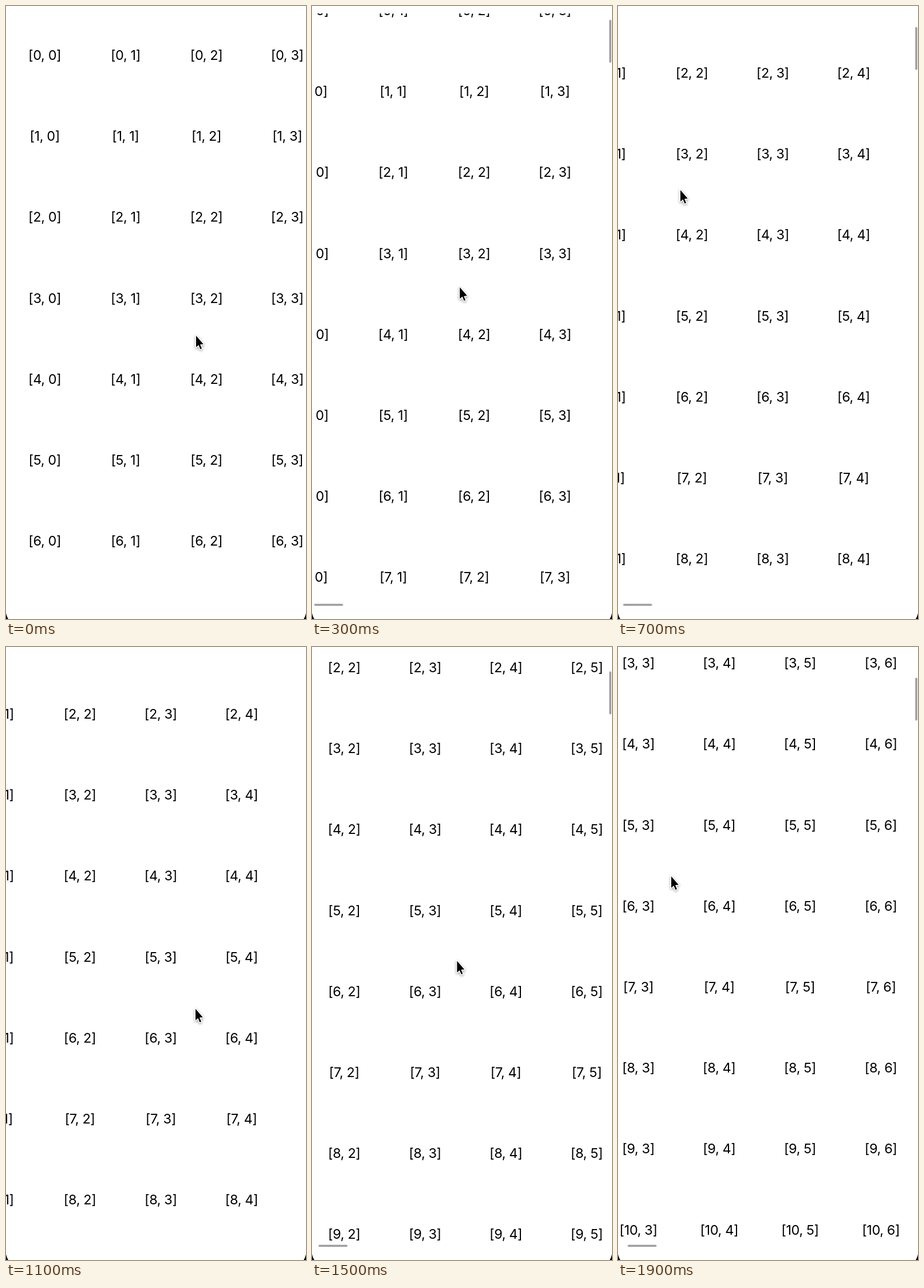
Write an HTML page with a canvas that moves like this. It is 524 px wide and 1069 px high and loops after 2 s.

```html
<!DOCTYPE html>
<html lang="en">
<head>
<meta charset="utf-8">
<title>Two-way scrolling grid</title>
<style>
  html, body { margin: 0; width: 100%; height: 100%; overflow: hidden; background: #fff; }
  canvas { display: block; }
</style>
</head>
<body>
<canvas id="stage" width="524" height="1069"></canvas>
<script>
const W = 524, H = 1069, LOOP = 2000, STEP = 100;
const VIEW_TOP = 13, VIEW_BOTTOM = 1051;
const PITCH = 141.2, FIRST_X = 67.7, FIRST_Y = 94;
const ARROW = new Path2D('M0 0V20L4.4 16.2L7.4 23.4L10 22.3L7 15.3L12.8 14.7Z');
const ctx = document.getElementById('stage').getContext('2d');

// Progress from 0 to 1 between two times
const linear = (t, from, to) => Math.min(1, Math.max(0, (t - from) / (to - from)));
const smooth = (t, from, to) => {
  const u = linear(t, from, to);
  return u * u * (3 - 2 * u);
};

// A steady drag, a move back, then a second drag that slows down
function pointerAt(t) {
  const back = smooth(t, 700, 1100);
  return [
    332 - 223 * linear(t, 102, 700) + 222 * back - 238 * smooth(t, 1267, 1877),
    575 - 254 * linear(t, 101, 700) + 310 * back - 231 * smooth(t, 1243, 1875)
  ];
}

// The content trails the pointer a little
function scrollAt(t) {
  return [
    221 * linear(t, 126, 700) + 235 * smooth(t, 1257, 1913),
    251.5 * linear(t, 120, 700) + 230 * smooth(t, 1234, 1899)
  ];
}

function barOpacity(t) {
  return linear(t, 100, 200) - linear(t, 900, 1100) + linear(t, 1300, 1400);
}

function drawGrid(sx, sy) {
  ctx.save();
  ctx.beginPath();
  ctx.rect(0, VIEW_TOP, W, VIEW_BOTTOM - VIEW_TOP);
  ctx.clip();
  ctx.fillStyle = '#000';
  ctx.font = '23.5px Inter, sans-serif';
  ctx.letterSpacing = '-0.4px';
  ctx.textAlign = 'center';
  ctx.textBaseline = 'alphabetic';
  const row0 = Math.max(0, Math.floor(sy / PITCH) - 1);
  const col0 = Math.max(0, Math.floor(sx / PITCH) - 1);
  for (let row = row0; row < row0 + 11; row++) {
    for (let col = col0; col < col0 + 6; col++) {
      ctx.fillText(`[${row}, ${col}]`, FIRST_X + col * PITCH - sx, FIRST_Y + row * PITCH - sy);
    }
  }
  ctx.restore();
}

function drawBar(x, y, w, h) {
  ctx.beginPath();
  ctx.roundRect(x, y, w, h, 1.8);
  ctx.fill();
}

function drawBars(sx, sy, alpha) {
  ctx.fillStyle = `rgba(0, 0, 0, ${0.38 * alpha})`;
  drawBar(519.2, 18.2 + sy * 0.0731, 3.6, 75);
  drawBar(1.6 + sx * 0.0335, 1042.4, 50.5, 3.6);
}

function drawCorners() {
  ctx.fillStyle = '#000';
  for (const [x, dir] of [[0, 1], [W, -1]]) {
    ctx.beginPath();
    ctx.moveTo(x, 1059);
    ctx.quadraticCurveTo(x + dir * 1.5, 1065, x + dir * 4, H);
    ctx.lineTo(x, H);
    ctx.fill();
  }
}

function drawPointer(x, y) {
  ctx.save();
  ctx.translate(x, y);
  ctx.save();
  ctx.shadowColor = 'rgba(0, 0, 0, 0.4)';
  ctx.shadowBlur = 4;
  ctx.shadowOffsetY = 1.5;
  ctx.strokeStyle = '#fff';
  ctx.lineWidth = 3;
  ctx.lineJoin = 'round';
  ctx.stroke(ARROW);
  ctx.restore();
  ctx.fillStyle = '#000';
  ctx.fill(ARROW);
  ctx.restore();
}

function draw(now) {
  const t = Math.floor((now % LOOP) / STEP) * STEP;
  const [sx, sy] = scrollAt(t);
  ctx.fillStyle = '#fff';
  ctx.fillRect(0, 0, W, H);
  drawGrid(sx, sy);
  drawBars(sx, sy, barOpacity(t));
  drawCorners();
  drawPointer(...pointerAt(t));
}

const start = performance.now();
function tick() {
  draw(performance.now() - start);
  requestAnimationFrame(tick);
}
tick();
</script>
</body>
</html>
```
